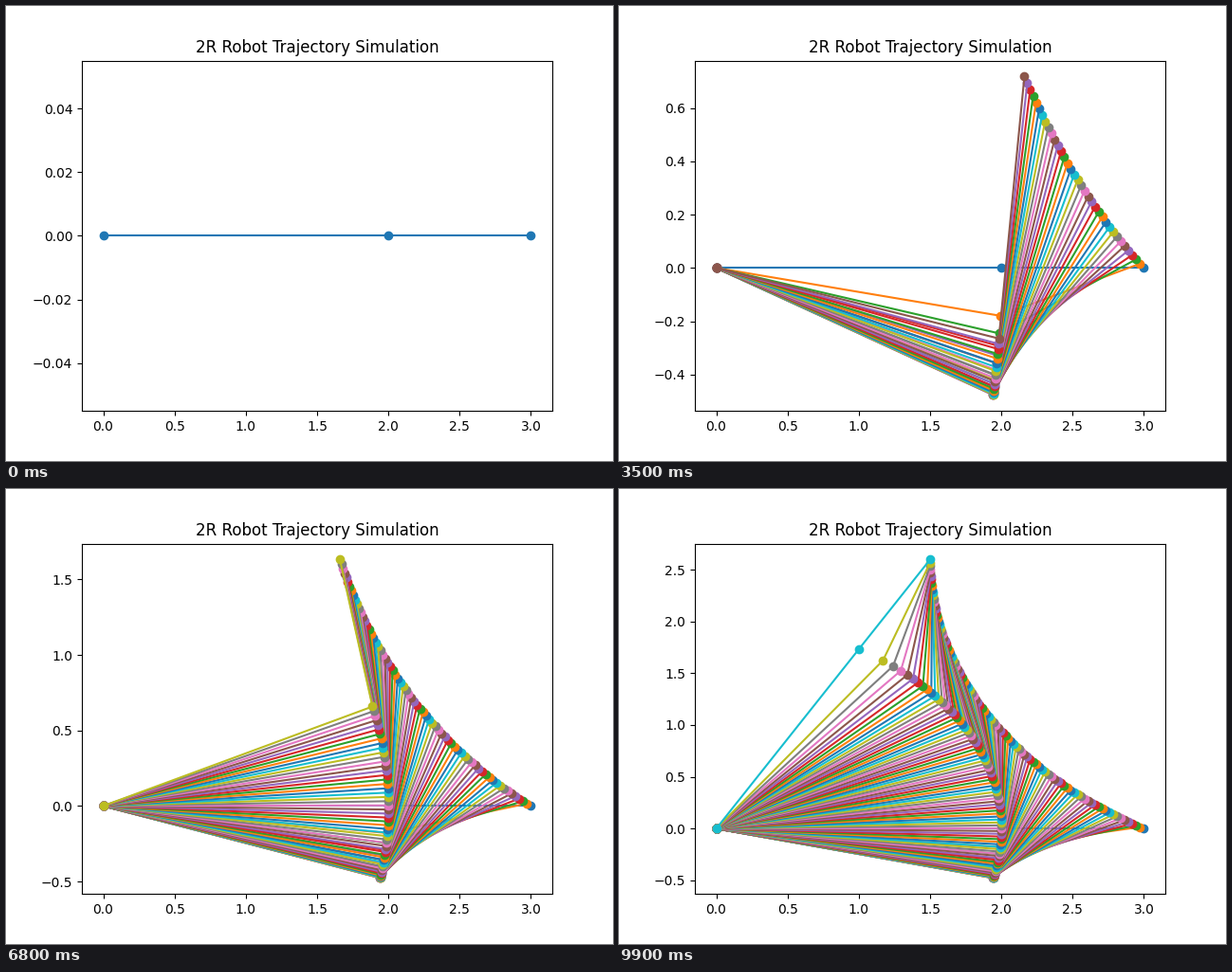
Write a matplotlib script that moves like this. It is 640 px wide and 480 px high and loops after 10000 ms.

```python
import numpy as np
import matplotlib.pyplot as plt
from matplotlib.animation import FuncAnimation

FRAMES = 100
L1, L2 = 2.0, 1.0


def trajectory(n):
    """End effector positions along a 60 degree arc of radius 3."""
    a = np.radians(np.linspace(240, 180, n))
    x = 4.5 + 3 * np.cos(a)
    y = 1.5 * np.sqrt(3) + 3 * np.sin(a)
    return np.round(x, 9), np.round(y, 9)


def elbow(x, y):
    """Elbow-down joint position for a given end effector."""
    c2 = (x**2 + y**2 - L1**2 - L2**2) / (2 * L1 * L2)
    c2 = np.clip(np.round(c2, 7), -1, 1)
    s2 = np.sqrt(1 - c2**2)
    q1 = np.arctan2(y, x) - np.arctan2(L2 * s2, L1 + L2 * c2)
    return L1 * np.cos(q1), L1 * np.sin(q1)


fig, ax = plt.subplots(figsize=(6.4, 4.8), dpi=100)
ax.set_title("2R Robot Trajectory Simulation")

px, py = trajectory(FRAMES)
ex, ey = elbow(px, py)
arms = [
    ax.plot([0, ex[k], px[k]], [0, ey[k], py[k]], "o-", color=f"C{k % 10}")[0]
    for k in range(FRAMES)
]


def update(i):
    for k, arm in enumerate(arms):
        arm.set_visible(k <= i)
    ax.relim(visible_only=True)
    ax.autoscale_view()
    return arms


anim = FuncAnimation(fig, update, frames=FRAMES, interval=100,
                     repeat=True, repeat_delay=0, blit=False)
plt.show()
```
